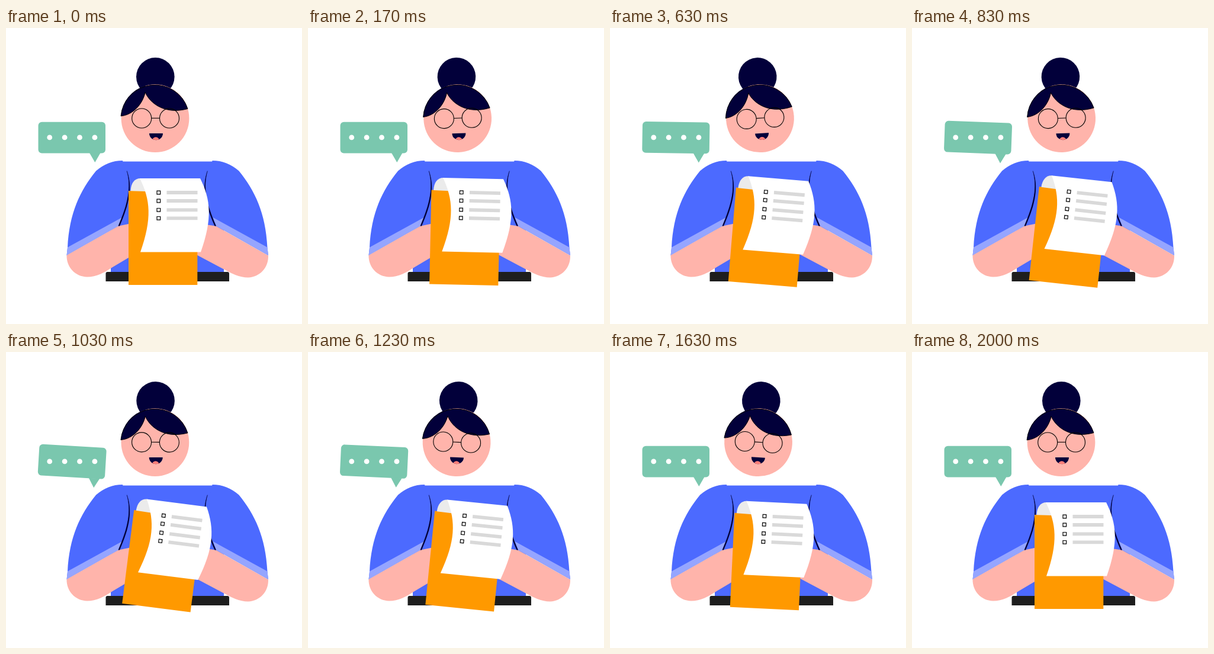
Animation of 500 by 500 pixels, one loop 2030 ms. Source, as an HTML page with a canvas:

```html
<!DOCTYPE html>
<html lang="en">
<head>
<meta charset="utf-8">
<title>Checklist</title>
<style>
  html, body { margin: 0; width: 100%; height: 100%; overflow: hidden; background: #fff; }
  canvas { display: block; width: 500px; height: 500px; }
</style>
</head>
<body>
<canvas id="stage"></canvas>
<script>
const LOOP = 2030;
const BLUE = '#4c6aff', CUFF = '#95a5ff', SKIN = '#ffb4ab', NAVY = '#02003a';
const ORANGE = '#ff9900', GREEN = '#7ac7ae', BLACK = '#000';

const canvas = document.getElementById('stage');
const ctx = canvas.getContext('2d');
const dpr = window.devicePixelRatio || 1;
canvas.width = canvas.height = Math.round(500 * dpr);

function fill(path, color) {
  ctx.fillStyle = color;
  ctx.fill(typeof path === 'string' ? new Path2D(path) : path);
}

function stroke(path, width, color = BLACK) {
  ctx.lineWidth = width;
  ctx.strokeStyle = color;
  ctx.stroke(typeof path === 'string' ? new Path2D(path) : path);
}

function disc(x, y, r) {
  const p = new Path2D();
  p.arc(x, y, r, 0, Math.PI * 2);
  return p;
}

function box(x, y, w, h, radii = 0) {
  const p = new Path2D();
  p.roundRect(x, y, w, h, radii);
  return p;
}

function rotated(deg, x, y, draw) {
  ctx.save();
  ctx.translate(x, y);
  ctx.rotate(deg * Math.PI / 180);
  ctx.translate(-x, -y);
  draw();
  ctx.restore();
}

function mirrored(sum, draw) {
  ctx.save();
  ctx.translate(sum, 0);
  ctx.scale(-1, 1);
  draw();
  ctx.restore();
}

// Linear interpolation through [step, value] pairs
function track(step, keys) {
  for (let i = 1; i < keys.length; i++) {
    const [a, va] = keys[i - 1], [b, vb] = keys[i];
    if (step <= b) return va + (vb - va) * (step - a) / (b - a);
  }
  return keys[keys.length - 1][1];
}

function sleeve() {
  fill('M197 224C180 224 165 230 152 241.500C125 275 107 312 104 371L102.500 384L190 334.500L207 270Z', BLUE);
  fill('M104 370.500L196 320L190.500 334.500L102.500 384.500Z', CUFF);
}

function fold() {
  fill('M204 241C212 268 206 297 189.500 334.500L192 334.500C208.500 297 214.500 268 204 241Z', NAVY);
  stroke('M204.200 241.500C212.500 268 207 297 191 334', 0.7, NAVY);
}

function body() {
  fill('M197 225.500H349L368 340V412H177V340Z', BLUE);
  fill(box(168.500, 412, 208.500, 16, [3, 3, 0, 0]), '#1e1e1e');
  sleeve();
  mirrored(545.5, sleeve);
  fill('M102.500 384L190 334.500L212 330V385L180 404C166 413 153 420.500 137 420.500C117 420 102 404 102.500 384Z', SKIN);
  fill('M443 384.500L354.500 334.500L330 331L318 381L366 406.500C382 415 394 421.500 409 421.500C429 420.500 443.500 405 443 384.500Z', SKIN);
  fold();
  mirrored(544.5, fold);
}

function head() {
  fill(disc(252.3, 82.3, 32.3), NAVY);
  fill(disc(252, 152.7, 57.4), SKIN);

  const left = 'M194 148.800A58 58 0 0 1 235.500 97.300V109C231 128 215 147 194 148.800Z';
  const right = 'M225 102.500A58 58 0 0 1 307 136.500C268 147 243 127 235 108.500L225 103Z';
  for (const lock of [left, right]) fill(lock, NAVY);
  stroke('M194 148.800A58 58 0 0 1 307 136.500C268 147 243 127 235 108.500C231 128 215 147 194 148.800', 0.9);

  stroke(disc(229.2, 152.5, 16.5), 1.1);
  stroke(disc(276, 152.5, 16.5), 1.1);
  stroke('M245.700 152.300H259.500', 1.1);

  const mouth = new Path2D('M242 178H265A11.500 11.200 0 0 1 242 178Z');
  fill(mouth, NAVY);
  ctx.save();
  ctx.clip(mouth);
  fill(disc(253, 190.3, 6), '#ff7f79');
  ctx.restore();
}

function papers() {
  fill(box(207, 275, 116.3, 159), ORANGE);
  fill('M210.500 275.300C211 262 217 254 227 254L237 276Z', '#ebebeb');
  fill('M226 254H328C346 290 349 322 329 378.500H227C247 322 244 290 226 254Z', '#fff');
  for (const y of [278, 292, 307.3, 321.3]) {
    stroke(box(255, y - 2.8, 5.6, 5.6), 1.2);
    fill(box(271.5, y - 2.9, 52, 5.8), '#d9d9d9');
  }
}

function bubble() {
  fill(box(54.5, 158.7, 113.5, 52.8, 6), GREEN);
  fill('M141 211H159.500L150.300 227Z', GREEN);
}

function draw(step) {
  ctx.setTransform(dpr, 0, 0, dpr, 0, 0);
  ctx.fillStyle = '#fff';
  ctx.fillRect(0, 0, 500, 500);

  const paperTilt = track(step, [[0, 0], [30, 7.5], [60, 0]]);
  const headTilt = track(step, [[0, 0], [15, -5], [45, 5], [60, 0]]);
  const bubbleTilt = track(step, [[0, 0], [15, 0], [32.5, 3.75], [48, 0], [60, 0]]);

  body();
  rotated(headTilt, 252, 130, head);
  rotated(paperTilt, 275, 344, papers);
  rotated(bubbleTilt, 111.3, 192.8, bubble);
  for (let i = 0; i < 4; i++) fill(disc(73.7 + 25.4 * i, 184.9, 4.4), '#fff');
}

// Thirty steps a second, on 10 ms boundaries
function stepAt(ms) {
  const rest = ms % 100;
  return Math.floor(ms / 100) * 3 + (rest >= 30) + (rest >= 70);
}

const start = performance.now();
function tick() {
  const ms = (performance.now() - start) % LOOP;
  draw(Math.min(stepAt(ms), 60));
  requestAnimationFrame(tick);
}
tick();
</script>
</body>
</html>
```
